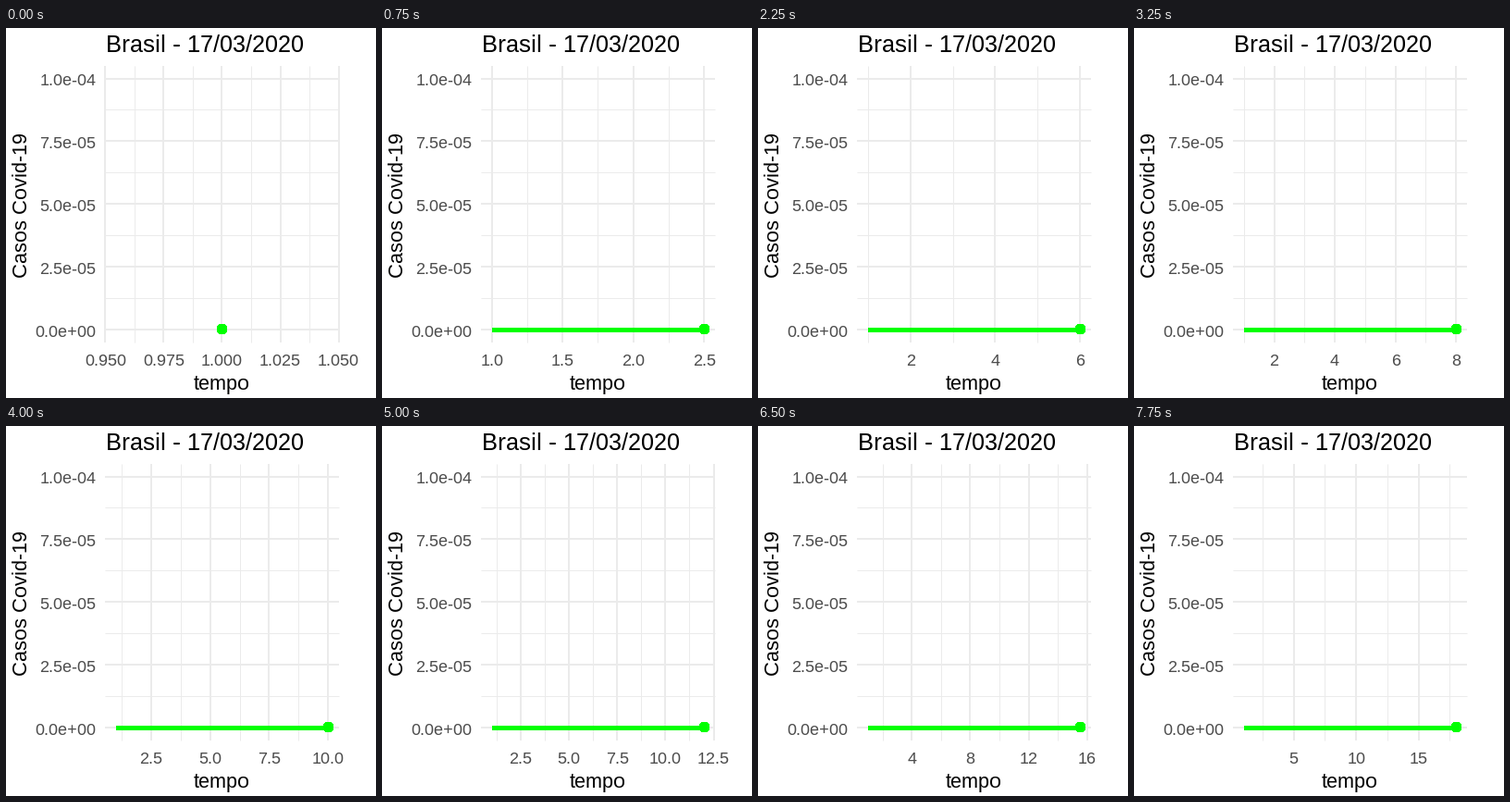
A matplotlib script for the animation above (8000 ms loop, 400 px wide and 400 px high).

```python
import math
from itertools import product

import matplotlib.pyplot as plt
import numpy as np
from matplotlib.animation import FuncAnimation
from matplotlib.patches import Circle

SIZE, DPI = 400, 100
FRAMES, INTERVAL = 32, 250
LEFT, RIGHT, TOP, BOTTOM = 107.3, 359.6, 40.93, 339.87
GRID, TICK, GREEN = "#EBEBEB", "#4D4D4D", "#00FF00"
FRAMES_PER_DAY = 1.8
NICE = [1, 5, 2, 2.5, 4, 3]

plt.rcParams.update({
    "font.family": "Liberation Sans",
    "text.hinting": "native",
    "text.hinting_factor": 1,
})


def pt(px):
    return px * 72 / DPI


def day_at(frame):
    """Each day lands on a whole frame; days between are interpolated."""
    days = np.arange(1, 30)
    stops = np.round((days - 1) * FRAMES_PER_DAY)
    return float(np.interp(frame, stops, days))


def nice_breaks(lo, hi, m=5):
    """Extended Wilkinson labelling, searched exhaustively."""
    span = hi - lo
    best, breaks = -9, []
    for j, (i, q), k, up in product((1, 2, 3), enumerate(NICE), range(2, 12), (0, 1)):
        z = math.ceil(math.log10(span / (k + 1) / j / q)) + up
        step = j * q * 10.0 ** z
        first = (math.floor(hi / step) - k + 1) * j
        last = math.ceil(lo / step) * j
        for start in range(first, last + 1):
            a = start * step / j
            b = a + step * (k - 1)
            zero = start % j == 0 and a <= 0 <= b
            simple = 1 - i / (len(NICE) - 1) - j + zero
            cover = 1 - 0.5 * ((hi - b) ** 2 + (lo - a) ** 2) / (0.1 * span) ** 2
            r = (k - 1) / (b - a)
            rt = (m - 1) / (max(b, hi) - min(a, lo))
            dense = 2 - max(r / rt, rt / r)
            score = 0.25 * simple + 0.2 * cover + 0.5 * dense + 0.05
            if score > best + 1e-9:
                best, breaks = score, [a + n * step for n in range(k)]
    return breaks


def inside(values, lo, hi):
    return [v for v in values if lo - 1e-9 <= v <= hi + 1e-9]


def labels(values):
    digits = next(d for d in range(8)
                  if all(abs(round(v, d) - v) < 1e-8 for v in values))
    return [f"{v:.{digits}f}" for v in values]


fig = plt.figure(figsize=(SIZE / DPI, SIZE / DPI), dpi=DPI, facecolor="white")
ax = fig.add_axes([0, 0, 1, 1])


def write(x, y, text, px, color="black", ha="center", **kw):
    ax.text(x, y, text, fontsize=pt(px), color=color, ha=ha, va="baseline", **kw)


def rule(xs, ys, width):
    ax.plot(xs, ys, color=GRID, lw=pt(width), solid_capstyle="butt", snap=True)


def y_pos(v):
    """Pixel row of a value given in units of 1e-4."""
    return BOTTOM - (v + 0.05) / 1.1 * (BOTTOM - TOP)


def draw(frame):
    ax.clear()
    ax.set_xlim(0, SIZE)
    ax.set_ylim(SIZE, 0)
    ax.axis("off")

    day = day_at(frame)
    pad = 0.05 * (day - 1) or 0.05
    lo, hi = 1 - pad, day + pad

    def x_pos(v):
        return LEFT + (v - lo) / (hi - lo) * (RIGHT - LEFT)

    breaks = nice_breaks(lo, hi)
    step = breaks[1] - breaks[0]
    minor = [breaks[0] - step / 2] + [b + step / 2 for b in breaks]
    major = inside(breaks, lo, hi)

    for v in np.arange(0.125, 1, 0.25):
        rule([LEFT, RIGHT], [y_pos(v)] * 2, 1)
    for v in inside(minor, lo, hi):
        rule([x_pos(v)] * 2, [TOP, BOTTOM], 1)
    for v in np.arange(0, 1.1, 0.25):
        rule([LEFT, RIGHT], [y_pos(v)] * 2, 2)
        text = f"{v * 1e-4:.1e}" if v else "0.0e+00"
        write(97.5, y_pos(v) + 7.5, text, 18, TICK, "right")
    for v, text in zip(major, labels(major)):
        rule([x_pos(v)] * 2, [TOP, BOTTOM], 2)
        write(x_pos(v), 365, text, 18, TICK)

    # Line and dot sit on whole pixels.
    base = round(y_pos(0)) - 0.5
    if day > 1:
        ax.plot([x_pos(1), x_pos(day)], [base, base], color=GREEN, lw=pt(5),
                solid_capstyle="butt", antialiased=False, snap=True, zorder=3)
    ax.add_patch(Circle((round(x_pos(day)) + 0.5, base), 5.5, fc=GREEN, ec="none",
                        antialiased=False, zorder=4))

    write(107.6, 26, "Brasil - 17/03/2020", 26, ha="left")
    write(232.8, 391, "tempo", 22)
    write(23.4, 191, "Casos Covid-19", 22, rotation=90, rotation_mode="anchor")
    return []


anim = FuncAnimation(fig, draw, frames=FRAMES, interval=INTERVAL,
                     init_func=lambda: [], repeat=True, repeat_delay=0)
plt.show()
```
